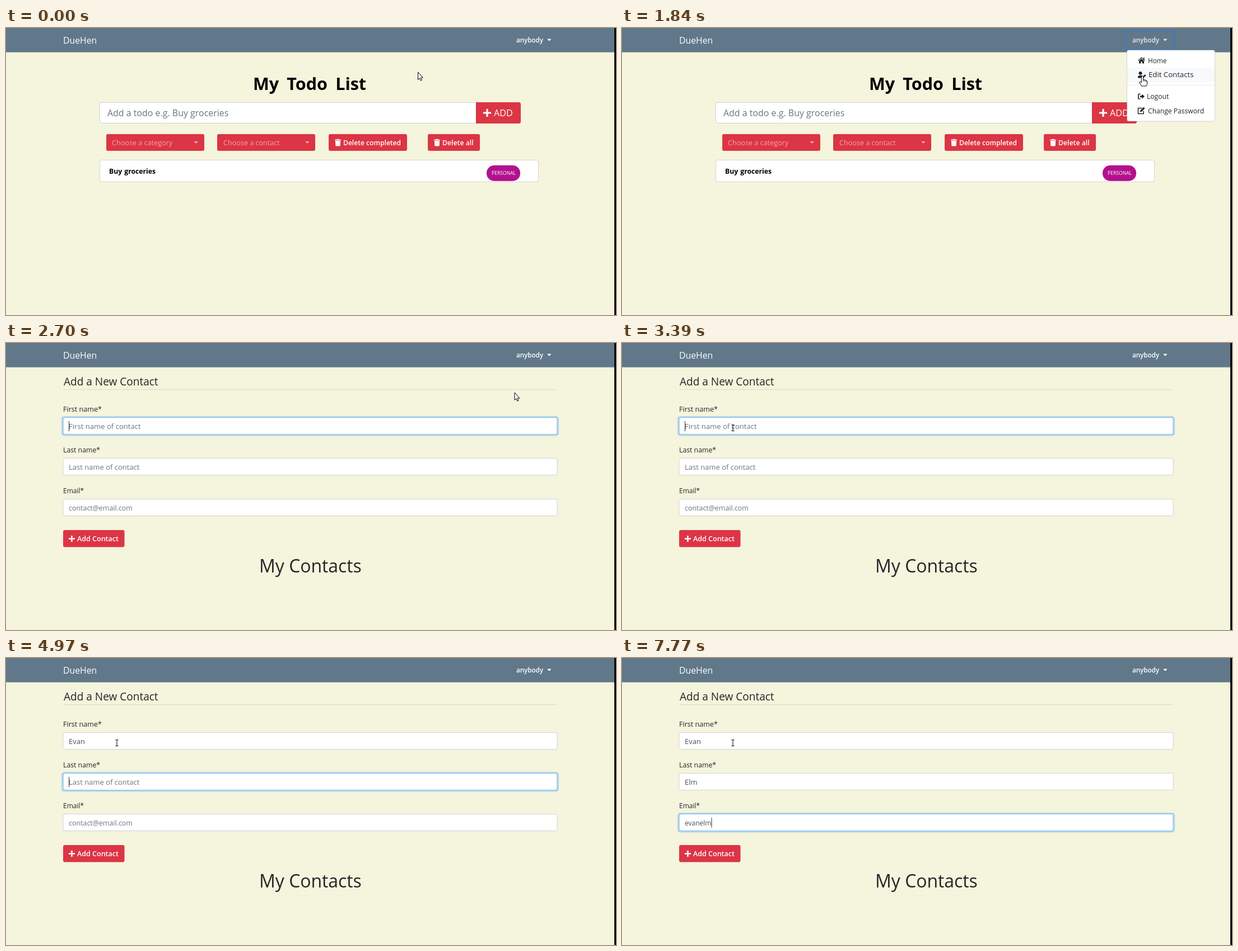
An HTML page that plays this animation: 1089x514 px, repeating every 8000 ms.

```html
<!DOCTYPE html>
<html lang="en">
<head>
<meta charset="utf-8">
<title>Todo list and contacts</title>
<style>
  html, body { margin: 0; width: 100%; height: 100%; overflow: hidden; background: #f5f4dc; }
  svg { display: block; width: 1089px; height: 514px; }
  text { font-family: "Open Sans", "Noto Sans", sans-serif; font-size: 12.6px; fill: #212529; white-space: pre; }
  .white { fill: #fff; }
  .semi { fill: #fff; font-weight: 600; }
  .bold { fill: #000; font-weight: 700; }
  .dim { fill: #fff; fill-opacity: .55; }
  .hint { fill: #6c757d; }
  .value { fill: #495057; font-size: 13px; }
  .red { fill: #dc3545; }
  .box { fill: #fff; stroke: #ced4da; }
  .card { fill: #fff; stroke: #000; stroke-opacity: .14; }
  .icon { fill: #212529; }
  .pointer { fill: #fff; stroke: #000; stroke-linejoin: round; }
  .line { fill: none; stroke: #000; }
</style>
</head>
<body>
<svg viewBox="0 0 1089 514">
  <defs>
    <path id="down" d="M0 0H7.6L3.8 4Z"/>
    <path id="plus" d="M-1.6-7H1.6V-1.6H7V1.6H1.6V7H-1.6V1.6H-7V-1.6H-1.6Z"/>
    <path id="trash" d="M0 1.2H3.4L4 .3H7L7.6 1.2H11V2.8H0ZM.8 3.6H10.2L9.6 13H1.4Z"/>
  </defs>

  <rect width="1089" height="514" fill="#f5f4dc"/>
  <rect width="1086" height="43.5" fill="#60788a"/>
  <text class="white" x="102" y="28" style="font-size:15.8px;font-weight:500">DueHen</text>
  <g id="account">
    <text class="semi" x="911" y="26" style="font-size:11.6px">anybody</text>
    <use href="#down" class="white" x="966" y="19.5"/>
  </g>
  <rect id="ring" x="899" y="5" width="86" height="33" rx="1.5" fill="none" stroke="#4379b3" stroke-width="2"/>

  <g id="list">
    <text class="bold" x="441" y="111" style="font-size:30.5px;word-spacing:6.3px">My Todo List</text>
    <path class="box" d="M839 133.5H171Q167.500 133.500 167.500 137V167Q167.500 170.500 171 170.500H839Z"/>
    <text class="hint" x="181" y="158" style="font-size:15.95px">Add a todo e.g. Buy groceries</text>
    <path class="red" d="M839 133H915.500Q919 133 919 136.500V167.500Q919 171 915.500 171H839Z"/>
    <use href="#plus" class="white" x="859" y="152"/>
    <text class="white" x="871" y="158" style="font-size:16.2px;font-weight:500">ADD</text>

    <g class="red">
      <rect x="179" y="190" width="175" height="30" rx="3"/>
      <rect x="377" y="190" width="175" height="30" rx="3"/>
      <rect x="576" y="190" width="140" height="30" rx="3"/>
      <rect x="753" y="190" width="93" height="30" rx="3"/>
    </g>
    <text class="dim" x="189" y="210">Choose a category</text>
    <use href="#down" class="dim" x="335.500" y="203"/>
    <text class="dim" x="388" y="210">Choose a contact</text>
    <use href="#down" class="dim" x="534" y="203"/>
    <use href="#trash" class="white" x="587" y="198.500"/>
    <text class="semi" x="602" y="210" style="font-size:12.1px">Delete completed</text>
    <use href="#trash" class="white" x="764" y="198.500"/>
    <text class="semi" x="779" y="210" style="font-size:12.3px">Delete all</text>

    <rect class="card" x="167.500" y="236.500" width="783" height="39" rx="3"/>
    <text class="bold" x="184" y="261" style="font-size:12.2px;word-spacing:1px">Buy groceries</text>
    <rect x="858" y="246" width="60" height="28" rx="13.500" fill="#b3118e"/>
    <text class="white" x="867" y="263" style="font-size:8.6px">PERSONAL</text>
  </g>

  <g id="menu">
    <rect class="card" x="901.500" y="39.500" width="157" height="127.500" rx="3"/>
    <rect id="hover" x="902" y="71" width="156" height="26" fill="#f8f9fa"/>
    <path d="M902 102.500H1058" stroke="#e9ecef"/>
    <g class="icon">
      <path transform="translate(921 52)" d="M0 6L6.500.3L13 6L12.200 6.900L6.500 2L.8 6.900ZM2 7L6.500 3.200L11 7V11.500H7.800V8H5.200V11.500H2ZM10 .8H11.500V4H10Z"/>
      <path transform="translate(921 78)" d="M1.500 3A3 3 0 0 1 7.500 3A3 3 0 0 1 1.500 3ZM0 11.500V9.500Q0 7 3 7H6.500L8 8L6.300 11.500ZM7.500 12L8 9.700L12.600 5.100L14.600 7.100L10 11.600Z"/>
      <path transform="translate(921 117.500)" d="M4.500 0V1.600H1.700V8.400H4.500V10H1.500Q0 10 0 8.500V1.500Q0 0 1.500 0ZM4 3.400H7.300V.8L12 5L7.300 9.200V6.600H4Z"/>
      <g transform="translate(920.500 141.500)">
        <path d="M8 2H1V12H10.500V7" fill="none" stroke="#212529" stroke-width="1.500"/>
        <path d="M4.200 8.800L4.700 6.300L10.700.3L13 2.600L7 8.500Z"/>
      </g>
    </g>
    <text x="939" y="63" style="font-size:11.8px">Home</text>
    <text x="940" y="88" style="font-size:13.2px">Edit Contacts</text>
    <text x="937" y="127" style="font-size:12.1px">Logout</text>
    <text x="939" y="153" style="font-size:12.1px">Change Password</text>
  </g>

  <g id="status">
    <path d="M-1 504.500H358Q360.500 504.500 360.500 507V516H-1Z" fill="#fff" stroke="#c9c9c4"/>
    <text x="2" y="516" style="font-size:9.2px;fill:#777">Waiting for localhost...</text>
  </g>

  <g id="contacts">
    <text x="103" y="76" style="font-size:19.05px">Add a New Contact</text>
    <path d="M102 83.500H984" stroke="#000" stroke-opacity=".1"/>
    <text x="102" y="123">First name*</text>
    <text x="102" y="196" style="font-size:12.3px">Last name*</text>
    <text x="102" y="269" style="font-size:12px">Email*</text>
    <g id="fields"></g>
    <rect class="red" x="102" y="335" width="109.500" height="30.500" rx="3"/>
    <use href="#plus" class="white" transform="translate(117.500 350.500) scale(.79)"/>
    <text class="semi" x="127" y="355" style="font-size:12.5px">Add Contact</text>
    <text x="452" y="411" style="font-size:31.9px">My Contacts</text>
  </g>

  <rect x="1086" width="3" height="514"/>

  <path id="arrow" class="pointer" d="M.5 0V13.500L3.400 10.800L5.300 15.200L7.400 14.300L5.500 10H9.300Z"/>
  <g id="hand">
    <path class="pointer" d="M-1.700 1.500Q-1.700 0 0 0T1.700 1.500V6.500Q3.400 5.600 4.200 7.200Q6 6.600 6.600 8.200Q8.600 8 8.600 10V13Q8.600 15.500 7 18H-1.500Q-2.500 15.500-4.800 12.800Q-5.800 10.600-4.400 10.200Q-3.200 10-1.700 12Z"/>
    <path class="line" d="M1.700 6.500V9.500M4.200 7.200V9.800M6.600 8.200V10.200"/>
  </g>
  <path id="beam" class="line" d="M-2.500-5.500H-1Q0-5.500 0-4.500Q0-5.500 1-5.500H2.500M0-4.500V4.500M-2.500 5.500H-1Q0 5.500 0 4.500Q0 5.500 1 5.500H2.500"/>
</svg>

<script>
const LOOP = 8000, PAGE = 2620, CLOSE = 2150;
const $ = id => document.getElementById(id);
const clamp = v => Math.min(1, Math.max(0, v));
const show = (el, on) => el.setAttribute('visibility', on ? 'visible' : 'hidden');
const ease = p => p * p * (3 - 2 * p);

// Progress in n even jumps, the first at a and the last at b.
const jumps = (t, a, b, n) =>
  t < a ? 0 : clamp((Math.floor((t - a) / (b - a) * (n - 1) + .08) + 1) / n);
const fade = (t, a) => t < a ? 0 : clamp((t - a + 75) / 150);
const mix = (a, b, p) => a.map((v, i) => v + (b[i] - v) * p);

function make(tag, attrs, parent, text = '') {
  const el = document.createElementNS('http://www.w3.org/2000/svg', tag);
  for (const k in attrs) el.setAttribute(k, attrs[k]);
  el.textContent = text;
  return parent.appendChild(el);
}

// on/off: focus times; blink: caret goes dark until the first key
const fields = [
  { y: 134, hint: 'First name of contact', size: 13.1, value: 'Evan',
    on: 0, off: 4870, blink: 3790, keys: [4020, 4180, 4420, 4650] },
  { y: 207, hint: 'Last name of contact', size: 13, value: 'Elm',
    on: 4870, off: 5960, blink: 5410, keys: [5490, 5570, 5650] },
  { y: 280, hint: 'contact@email.com', size: 12.45, value: 'evanelm', valueSize: 12,
    on: 5960, off: LOOP, blink: 6510, keys: [6670, 6820, 7050, 7220, 7630, 7700, 7770] }
];

for (const f of fields) {
  const g = $('fields'), y = f.y;
  const frame = { x: 102, y: y - .5, width: 882, height: 30, rx: 3 };
  f.glow = make('rect', { x: 99, y: y - 3, width: 888, height: 35.5, rx: 5, fill: '#b5d7e6' }, g);
  make('rect', { ...frame, class: 'box' }, g);
  f.edge = make('rect', { ...frame, fill: 'none', stroke: '#80bdff' }, g);
  f.hintEl = make('text', { x: 112, y: y + 20, class: 'hint', style: `font-size:${f.size}px` }, g, f.hint);
  f.text = make('text', { x: 112, y: y + 20, class: 'value', style: `font-size:${f.valueSize || 13}px` }, g);
  f.caret = make('rect', { y: y + 6, width: 1, height: 18, fill: '#333' }, g);
}

function drawField(f, t) {
  const focus = fade(t, f.on) - fade(t, f.off);
  const typed = f.keys.filter(k => k <= t).length;
  f.glow.setAttribute('opacity', focus);
  f.edge.setAttribute('opacity', focus);
  f.text.textContent = f.value.slice(0, typed);
  const dark = t >= f.blink && !typed;
  const active = t >= PAGE && t >= f.on && t < f.off;
  f.caret.setAttribute('x', 112 + (typed ? f.text.getComputedTextLength() : 0));
  f.caret.setAttribute('opacity', active && !dark ? 1 : 0);
  f.hintEl.setAttribute('opacity', typed ? 0 : 1);
}

function drawPointer(t) {
  let at = mix([735, 79], [927, 22], ease(jumps(t, 760, 1210, 7)));
  at = mix(at, [929, 86], jumps(t, 1690, 1840, 3));
  if (t >= CLOSE) at = mix([928, 87], [198, 152], ease(jumps(t, 2700, 3390, 10)));
  const [x, y] = at;
  const kind = t < CLOSE ? (x > 899 && (y < 39 || t >= 1360) ? 'hand' : 'arrow')
    : y > 134 ? 'beam' : 'arrow';
  for (const id of ['arrow', 'hand', 'beam']) {
    show($(id), id === kind);
    $(id).setAttribute('transform', `translate(${x} ${y})`);
  }
}

function draw(t) {
  const home = t < PAGE;
  show($('list'), home);
  show($('contacts'), !home);
  show($('ring'), t >= 1360 && t < CLOSE);
  show($('menu'), t >= 1445 && t < CLOSE);
  show($('hover'), t >= 1768 && t < CLOSE);
  show($('status'), t >= 2230 && home);
  $('status').setAttribute('opacity', clamp((t - 2200) / 200));
  $('account').setAttribute('opacity', t >= 1135 && t < CLOSE ? .85 : 1);
  fields.forEach(f => drawField(f, t));
  drawPointer(t);
}

const start = performance.now();
function tick() {
  draw((performance.now() - start) % LOOP);
  requestAnimationFrame(tick);
}
tick();
</script>
</body>
</html>
```
